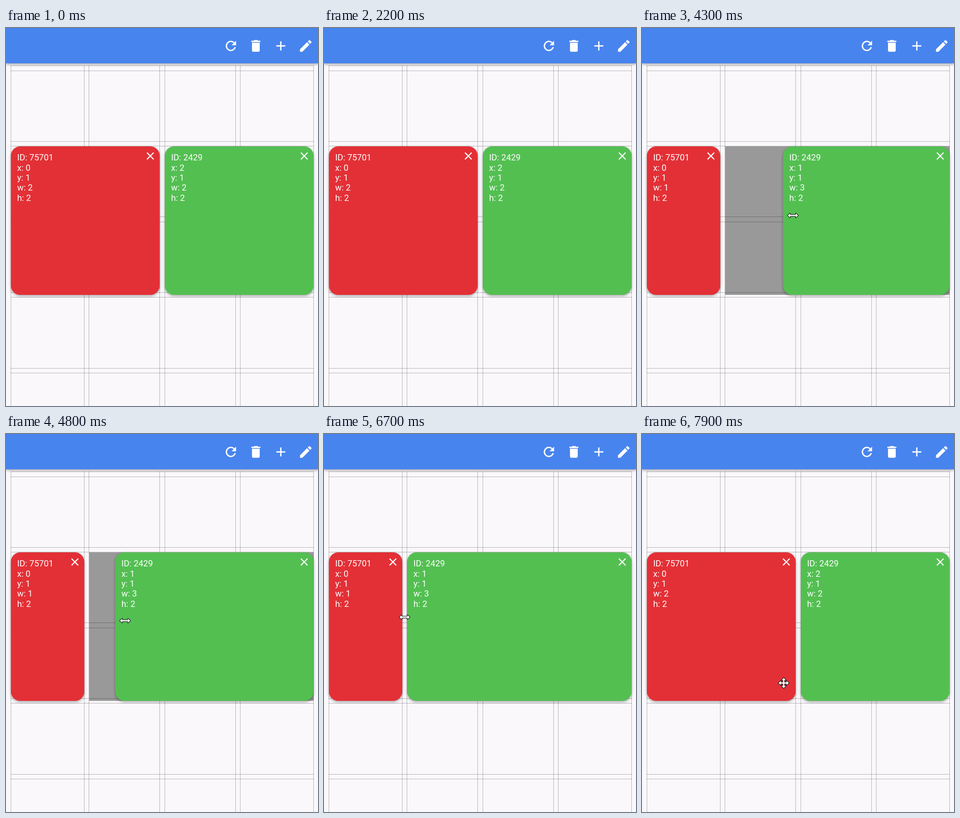
An HTML page with a canvas for the animation above (8000 ms loop, 600x728 px).

```html
<!DOCTYPE html>
<html lang="en">
<head>
<meta charset="utf-8">
<title>Resizable grid</title>
<style>
  html, body { margin: 0; width: 100%; height: 100%; overflow: hidden; background: #faf8fb; }
  canvas { display: block; }
</style>
</head>
<body>
<canvas id="stage" width="600" height="728"></canvas>
<script>
const ctx = document.getElementById('stage').getContext('2d');

const LOOP = 8000, STEP = 100, SETTLE = 300;
const TOP = 228, HEIGHT = 286, LEFT = 9.5, RIGHT = 591.5;
const COLUMN_LINES = [9, 150, 159, 295, 305, 441, 450, 591];
const ROW_LINES = [72, 82, 218, 227, 363, 373, 509, 518, 655, 664];

// Moments when each resize starts and is released
const GREEN_DRAG = { start: 4100, end: 5200 };
const RED_DRAG = { start: 6900, end: 7500 };

// Pointer path: time, x, y
const POINTER = [
  [2300, 423, 455], [3100, 364, 395], [3800, 327, 362], [4000, 327, 362],
  [4800, 229, 359.5], [5100, 182, 357], [5200, 182, 357], [5600, 118, 391],
  [5800, 118, 391], [6600, 155, 353], [6800, 155, 352.5], [7400, 270, 352],
  [7500, 272, 356], [7900, 272.5, 479.5]
];

const ICONS = {
  refresh: new Path2D('M13 11h7V4z'),
  refreshArc: new Path2D('M16.95 7.05A7 7 0 1 0 18.7 14'),
  trash: new Path2D('M6 19c0 1.1.9 2 2 2h8c1.1 0 2-.9 2-2V7H6zM19 4h-3.5l-1-1h-5l-1 1H5v2h14z'),
  plus: new Path2D('M5 12H19M12 5V19'),
  pencil: new Path2D('M3 17.25V21h3.75L17.81 9.94l-3.75-3.75zM20.71 7.04c.39-.39.39-1.02 0-1.41' +
    'l-2.34-2.34c-.39-.39-1.02-.39-1.41 0l-1.83 1.83 3.75 3.75z'),
  cross: new Path2D('M5.7 5.7L18.3 18.3M18.3 5.7L5.7 18.3')
};
const ARROW = new Path2D('M-10 0L-5.5-4V-1.2H5.5V-4L10 0L5.5 4V1.2H-5.5V4z');

const mix = (a, b, p) => a + (b - a) * p;

function settle(from, to, elapsed) {
  const p = Math.min(Math.max(elapsed / SETTLE, 0), 1);
  return mix(from, to, p * p * (3 - 2 * p));
}

function pointerAt(t) {
  const next = POINTER.findIndex(point => point[0] > t);
  if (next === 0) return null;
  if (next < 0) return POINTER.at(-1).slice(1);
  const [a, b] = [POINTER[next - 1], POINTER[next]];
  const p = (t - a[0]) / (b[0] - a[0]);
  return [mix(a[1], b[1], p), mix(a[2], b[2], p)];
}

function greenLeft(t) {
  const follow = time => Math.min(305.5, pointerAt(time)[0] - 19);
  if (t < GREEN_DRAG.start) return 305.5;
  if (t < GREEN_DRAG.end) return follow(t);
  if (t < RED_DRAG.start) return settle(follow(GREEN_DRAG.end), 160, t - GREEN_DRAG.end);
  return settle(160, 305.5, t - RED_DRAG.start + STEP);
}

function redRight(t) {
  const follow = time => pointerAt(time)[0] - 5;
  if (t < RED_DRAG.start) return settle(295.5, 150.5, t - GREEN_DRAG.start + STEP);
  if (t < RED_DRAG.end) return follow(t);
  return settle(follow(RED_DRAG.end), 295.5, t - RED_DRAG.end);
}

function setShadow(color, blur, y) {
  ctx.shadowColor = color;
  ctx.shadowBlur = blur;
  ctx.shadowOffsetY = y;
}

function icon(name, x, y, scale, stroked) {
  ctx.save();
  ctx.translate(x, y);
  ctx.scale(scale, scale);
  ctx.translate(-12, -12);
  ctx.lineWidth = 2;
  ctx.strokeStyle = ctx.fillStyle = '#fff';
  ctx[stroked ? 'stroke' : 'fill'](ICONS[name]);
  ctx.restore();
}

function drawHeader() {
  ctx.save();
  setShadow('rgba(0,0,0,.35)', 5, 2);
  ctx.fillStyle = '#4884ee';
  ctx.fillRect(0, 0, 600, 68);
  ctx.restore();
  icon('refresh', 432.5, 34.5, 1.24);
  icon('refreshArc', 432.5, 34.5, 1.24, true);
  icon('trash', 480.5, 34.5, 1.24);
  icon('plus', 528.5, 34.5, 1.24, true);
  icon('pencil', 576.5, 34.5, 1.24);
}

function drawGrid() {
  ctx.fillStyle = 'rgba(0,0,0,.25)';
  COLUMN_LINES.forEach(x => ctx.fillRect(x, 72, 1, 656));
  ROW_LINES.forEach(y => ctx.fillRect(9, y, 583, 1));
}

function drawTile(color, id, left, right, column, span) {
  ctx.save();
  setShadow('rgba(0,0,0,.35)', 5, 2);
  ctx.fillStyle = color;
  ctx.beginPath();
  ctx.roundRect(left, TOP, right - left, HEIGHT, 18);
  ctx.fill();
  ctx.restore();
  ctx.fillStyle = '#fff';
  ctx.font = '16.5px Roboto, sans-serif';
  [`ID: ${id}`, `x: ${column}`, 'y: 1', `w: ${span}`, 'h: 2'].forEach((line, i) =>
    ctx.fillText(line, left + 12, TOP + 27.4 + i * 19.3));
  icon('cross', right - 18, TOP + 18.5, 1.02, true);
}

function drawPointer([x, y], isResize) {
  const angles = isResize ? [0] : [0, Math.PI / 2];
  const eachArrow = paint => angles.forEach(angle => {
    ctx.save();
    ctx.translate(x, y);
    ctx.rotate(angle);
    paint();
    ctx.restore();
  });
  ctx.strokeStyle = '#111';
  ctx.fillStyle = '#fff';
  ctx.lineWidth = 2;
  ctx.lineJoin = 'round';
  eachArrow(() => ctx.stroke(ARROW));
  eachArrow(() => ctx.fill(ARROW));
}

function draw(t) {
  const during = drag => t >= drag.start && t < drag.end;
  const wideGreen = t >= GREEN_DRAG.start && t < RED_DRAG.start;

  ctx.fillStyle = '#faf8fb';
  ctx.fillRect(0, 0, 600, 728);
  ctx.fillStyle = '#999';
  if (during(GREEN_DRAG)) ctx.fillRect(160, TOP, RIGHT - 160, HEIGHT);
  if (during(RED_DRAG)) ctx.fillRect(LEFT, TOP, 286, HEIGHT);
  drawGrid();

  const tiles = [
    () => drawTile('#e33036', 75701, LEFT, redRight(t), 0, wideGreen ? 1 : 2),
    () => drawTile('#53bf51', 2429, greenLeft(t), RIGHT, wideGreen ? 1 : 2, wideGreen ? 3 : 2)
  ];
  if (t >= RED_DRAG.start) tiles.reverse();
  tiles.forEach(paint => paint());
  drawHeader();

  const pointer = pointerAt(t);
  const isResize = (t >= 3700 && t <= GREEN_DRAG.end) || (t >= 6500 && t <= RED_DRAG.end);
  if (pointer) drawPointer(pointer, isResize);
}

function tick() {
  const t = performance.now() % LOOP;
  draw(Math.floor(t / STEP) * STEP);
  requestAnimationFrame(tick);
}
tick();
</script>
</body>
</html>
```
